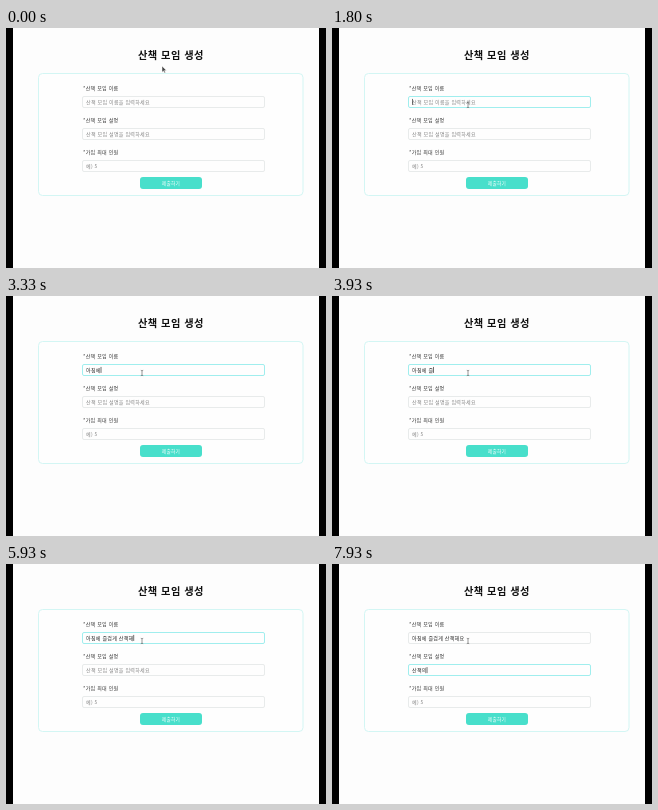
Write an HTML page that moves like this. It is 320 px wide and 240 px high and loops after 8 s.

```html
<!DOCTYPE html>
<html lang="ko">
<head>
<meta charset="utf-8">
<title>산책 모임 생성</title>
<style>
  html, body { margin: 0; width: 100%; height: 100%; overflow: hidden; background: #fdfdfd; }
  svg { display: block; width: 100%; height: 100%; }
  text { font: 5px "Noto Sans CJK KR", "Noto Sans CJK", sans-serif; letter-spacing: .06em; fill: #222; white-space: pre; }
  .title { font-size: 10.2px; font-weight: 700; letter-spacing: .05em; fill: #111; text-anchor: middle; }
  .label { font-weight: 500; fill: #333; }
  .hint { fill: #858585; }
  .submit { font-size: 4.7px; font-weight: 500; fill: #fff; text-anchor: middle; }
  .box { fill: #fefefe; stroke: #e8ebeb; }
  .box.focus { stroke: #a0eeee; }
</style>
</head>
<body>
<svg viewBox="0 0 320 240" xml:lang="ko">
  <rect width="320" height="240" fill="#fdfdfd"/>
  <rect width="7" height="240"/>
  <rect x="313" width="7" height="240"/>
  <text class="title" x="165" y="30.8">산책 모임 생성</text>
  <rect x="32.5" y="45.5" width="264.5" height="122" rx="4" fill="#fefefe" stroke="#d3f6f4"/>
  <g id="form"></g>
  <rect x="134" y="149" width="62" height="12" rx="3" fill="#48dfcb"/>
  <text class="submit" x="165" y="156.8">제출하기</text>
  <rect id="caret" width=".6" height="6" fill="#111"/>
  <path id="arrow" d="M0 0V6.2L1.5 4.9L2.5 7.1L3.5 6.6L2.5 4.6H4.5Z" fill="#444" stroke="#fff" stroke-width=".5"/>
  <path id="beam" d="M-1.2-2.7Q0-2.7 0-1.8Q0-2.7 1.2-2.7M0-1.8V1.8M-1.2 2.7Q0 2.7 0 1.8Q0 2.7 1.2 2.7" fill="none" stroke="#555" stroke-width=".6"/>
</svg>
<script>
  const LOOP = 8000, CLICK = 400, NEXT_FIELD = 6400;
  const $ = id => document.getElementById(id);

  function add(tag, attrs, text = '') {
    const node = document.createElementNS('http://www.w3.org/2000/svg', tag);
    for (const key in attrs) node.setAttribute(key, attrs[key]);
    node.textContent = text;
    $('form').append(node);
    return node;
  }

  const fields = [
    ['산책 모임 이름', '산책 모임 이름을 입력하세요'],
    ['산책 모임 설명', '산책 모임 설명을 입력하세요'],
    ['가입 최대 인원', '예) 5']
  ].map(([label, hint], i) => {
    const y = 68.5 + i * 32.2;
    add('text', { class: 'label', x: 77, y: y - 6.5 }, '*' + label);
    const box = add('rect', { class: 'box', x: 76.5, y: Math.floor(y) + .5, width: 182, height: 11, rx: 1.5 });
    return { y, hint, box, text: add('text', { x: 80, y: y + 7.2 }) };
  });

  // Each run: field, start, interval, fixed prefix, states of the syllables being composed.
  const runs = [
    [0, 2400, 150, '', 'ㅇ,아,앛,아치,아침,아침ㅇ,아침에'],
    [0, 3450, 150, '아침에', ' , ㅈ, 즈, 즐'],
    [0, 4060, 134, '아침에 ', '즑,즐거,즐겁,즐겁ㄱ,즐겁게,즐겁게 ,즐겁게 ㅅ,즐겁게 사'],
    [0, 5130, 134, '아침에 즐겁게 ', '산,산ㅊ,산채,산책,산책ㅎ,산책해,산책행,산책해요'],
    [1, 6600, 160, '', 'ㅅ,사,산,산ㅊ,산채,산책,산책ㅇ,산책으,산책의']
  ];
  const keys = runs.flatMap(([field, start, step, prefix, states]) =>
    states.split(',').map((s, i) => ({ field, at: start + i * step, value: prefix + s })));

  const mix = (a, b, p) => a + (b - a) * p;

  function render(t) {
    const focus = t < CLICK ? -1 : t < NEXT_FIELD ? 0 : 1;
    let lastAction = focus === 1 ? NEXT_FIELD : CLICK;
    const values = ['', '', ''];
    for (const key of keys) if (key.at <= t) {
      values[key.field] = key.value;
      lastAction = Math.max(lastAction, key.at);
    }
    fields.forEach((f, i) => {
      const shown = values[i] || f.hint;
      if (f.text.textContent !== shown) f.text.textContent = shown;
      f.text.setAttribute('class', values[i] ? '' : 'hint');
      f.box.setAttribute('class', i === focus ? 'box focus' : 'box');
    });

    const caretOn = focus >= 0 && Math.floor((t - lastAction) / 500) % 2 === 0;
    $('caret').style.display = caretOn ? '' : 'none';
    if (caretOn) {
      const f = fields[focus];
      const width = values[focus] ? f.text.getComputedTextLength() : 0;
      $('caret').setAttribute('x', 80 + width);
      $('caret').setAttribute('y', f.y + 2.4);
    }

    const p = Math.min(t / 350, 1), ease = p * p * (3 - 2 * p);
    const x = mix(156, 136, ease), y = mix(38, 77, ease);
    const overField = y > fields[0].y;
    $('arrow').style.display = overField ? 'none' : '';
    $('beam').style.display = overField ? '' : 'none';
    $(overField ? 'beam' : 'arrow').setAttribute('transform', `translate(${x} ${y})`);
  }

  const begin = performance.now();
  function tick() {
    render((performance.now() - begin) % LOOP);
    requestAnimationFrame(tick);
  }
  tick();
</script>
</body>
</html>
```
